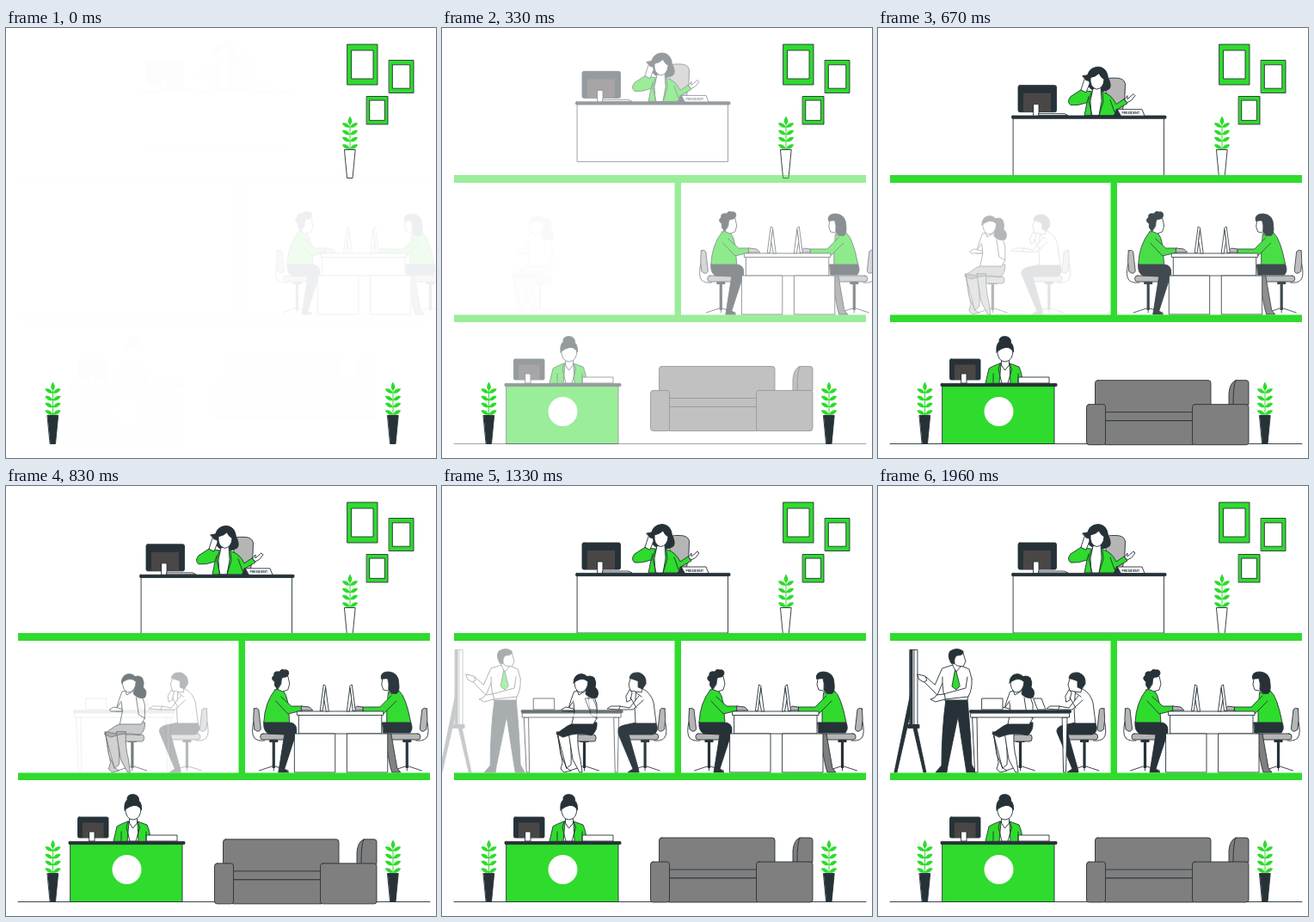
An HTML page that plays this animation: 500x500 px, repeating every 2000 ms.

```html
<!DOCTYPE html>
<html lang="en">
<head>
<meta charset="utf-8">
<title>Office</title>
<style>
html, body { margin: 0; width: 100%; height: 100%; overflow: hidden; background: #fff; }
svg { display: block; width: 100vw; height: 100vh; }
#stage { fill: #fff; stroke: #263238; stroke-width: .9; stroke-linejoin: round; stroke-linecap: round; }
.d { fill: #263238; }
.g { fill: #2fdb2d; }
.s { fill: #7f7f7f; }
.c { fill: #b5b5b5; }
.m { fill: #4a4646; }
.n { fill: none; }
.flat { stroke: none; }
text { font: 700 3.7px Inter, Arial, sans-serif; fill: #263238; stroke: none; }
</style>
</head>
<body>
<svg viewBox="0 0 500 500"><g id="stage"></g></svg>
<script>
const p = (d, c = '') => `<path class="${c}" d="${d}"/>`;
// Rectangle given by its left, top, right and bottom edges
const r = (x, y, x2, y2, c = '', rx = 0) =>
  `<rect class="${c}" x="${x}" y="${y}" width="${x2 - x}" height="${y2 - y}" rx="${rx}"/>`;
const at = (transform, body) => `<g transform="${transform}">${body}</g>`;
const group = (id, body) => `<g id="${id}">${body}</g>`;

const picture = (x, y, x2, y2, dx, dy) =>
  r(x, y, x2, y2, 'g') + r(x + dx, y + dy, x2 - dx, y2 - dy);

function plant(x, y, pot) {
  const leaf = 'M0 0C-2-5-6-6-9-5C-8-1-4 1 0 0Z';
  let s = '<path d="M0 0V-34" stroke="#2fdb2d" stroke-width="1"/>' +
    p('M0-29C-4-32-2-36 0-39C2-36 4-32 0-29Z', 'g flat');
  for (const h of [-1, -9.5, -17.5, -26])
    for (const side of [1, -1])
      s += at(`translate(0 ${h}) scale(${side} 1)`, p(leaf, 'g flat'));
  return at(`translate(${x} ${y})`, s + p('M-6.2 0H6.2L3 33H-3Z', pot));
}

const chairBase = x => at(`translate(${x} 0)`,
  r(-1.6, 296, 1.6, 328, 'd flat') + r(-5, 295, 5, 298, 'd flat') +
  p('M-17 331L-2 326H2L17 331M0 326V331', 'n'));

const chair = chairBase(310.5) +
  p('M287 274Q284 288 288 293Q292 297 300 296', 'n') +
  p('M287.5 259Q291 257 293 260L295.5 282Q295 286 291 285L288 283Q286 272 287.5 259Z', 'c') +
  r(295, 288, 332, 295, 'c', 3);
const mirror = (sum, body) => at(`translate(${sum} 0) scale(-1 1)`, body);

const building = r(14, 171, 493, 180, 'g flat') + r(270.5, 180, 278, 334, 'g flat') +
  r(14, 333.5, 493, 342, 'g flat') + p('M14 483.5H493', 'n');

const reception =
  // receptionist
  p('M125 413L129 396Q131 394 142 390H153L164 394Q167 400 168.500 413Z', 'g') +
  p('M143 391L141 413H154L153 391L148 397Z') + p('M143.500 382V392L147.500 398L152.500 392V382Z') +
  p('M142 390L140 397L144 413M153 390L155.500 397L151 413M134 402V413M163 402V413', 'n') +
  p('M138.500 374Q139 388 148 388Q157 387 157 374Q148 368 138.500 374Z') +
  p('M138 377Q137 368 141 365Q140 359 147.500 358.500Q155 359 154.500 366Q158 369 157.500 377Q156 373 151 371Q143 372 138 377Z', 'd') +
  r(83.5, 385, 119, 409, 'd', 1.5) + r(89, 391.5, 113.5, 409, 'm flat') + r(97, 402, 103, 413) +
  r(163.5, 406, 199, 413) +
  r(75, 416, 205, 483.5, 'g') + r(73, 413.4, 208, 416.6, 'd', 1) +
  '<circle class="flat" cx="140.500" cy="446" r="17"/>';

const sofa = r(252.5, 409, 387, 457, 's', 3) + r(264, 446, 387, 456, 's') +
  r(264, 456, 367, 484, 's') + r(242.5, 437, 264.5, 484, 's', 3) +
  p('M408 437V424Q409 412 416 409H428Q431 409 431 412V437Z', 's') +
  p('M416 409Q413 415 413 437', 'n') + r(365.5, 437, 431, 484, 's', 3);

const president =
  p('M264 60Q267 57 275 57.500Q286 57 287.500 64Q288 80 284 97L268 99Z', 'c') +
  p('M243 60Q243 45 256 44.500Q266 45 267.500 57Q272 66 269 70Q262 75 251 72Q243 69 243 60Z', 'd') +
  p('M248 73Q241 73 238 70L224 79Q219 85 224 89Q233 90 243 86L240 101H276L276 95L290 87L286 82L277 88Q272 77 262 74Z', 'g') +
  p('M250 70L247 84L248 101H257L260 84L259 68Z') +
  p('M248 74L245 84L249 101M261 75L262 85L257 101M243 86L245 79M270 83L275 97', 'n') +
  p('M247 57Q246 68 254 70.500Q262 70 263 59Q259 57 257 52Q253 56 247 57Z') +
  p('M236 71L239 62Q240 56 245 57L246 64L242 74Z') + p('M238 55L244 54L246 61L242 60Z', 'd') +
  p('M287 82L290 78L290 82L297 76L299 78Q295 85 290 86Z') +
  r(163, 66, 207.5, 97, 'd', 2) + r(169, 75, 201, 97, 'm flat') +
  r(181, 88, 187, 102) + p('M187 99H217L221 101H187Z') +
  r(157.5, 104, 332.5, 171) + r(155.5, 101.4, 335, 104.6, 'd', 1) +
  p('M278 94H307L310 101.500H282Z') + p('M278 94L274 101.500H282Z', 'd') +
  '<text x="283.500" y="99.500">PRESIDENT.</text>';

const screen = p('M364.500 261L368.500 231L371 232.500L367.500 261Z') +
  p('M371 235L374.500 262H371.500L369 248Z');

const duo = chair + mirror(776, chair) +
  // man at the left
  p('M299 275H328Q338 275 337 286L323 329L328 333H316L317 327L323 289L304 288Q298 284 299 275Z', 'd') +
  p('M312 237L320 236Q326 243 327 252L329 275H299Q300 252 312 237Z', 'g') +
  p('M319 245L331 256L344 256V261L327 265L313 250', 'g') + p('M343 256L352 257L356 261H343Z', 'c') +
  p('M315 224L327 221L329 230L327 237L321 239L314 236Z') +
  p('M315 236Q310 232 312 228Q306 224 311 220Q310 215 317 216Q319 212 323 214Q328 213 328 218Q327 223 321 222Q319 224 319 230Z', 'd') +
  // woman at the right
  p('M439 288H447L454 328L458 333H448L446 326Z', 's') +
  p('M437 275H470Q473 282 469 287H438Z', 'd') +
  p('M444 240L456 238Q464 244 470 275H442V260Z', 'g') +
  p('M447 244L434 257L414 257V262L438 265L453 250', 'g') + p('M414 257L407 256L402 261H414Z', 'c') +
  p('M437 224L436 231L438 237L443 238L448 242L449 221Z') +
  p('M435.500 224Q434 216 444 216Q456 217 456 230Q457 238 454 241Q448 243 444 237Q445 229 443 224Z', 'd') +
  // desk
  r(340, 266, 436, 288) + r(338, 262, 438, 266.5) + r(335, 288, 382, 333) + r(396, 288, 443, 333) +
  screen + mirror(770, screen);

const woman = chairBase(165.5) + r(153, 289, 179, 297, 'c', 3) +
  group('legs',
    p('M134 286L138 312L145 328L150 331L142 333L138 329L140 322Z M134 286L148 288Q151 312 150 324L145 328Z') +
    p('M147 286L152 318L160 333H163L161 318Q157 304 158 286Z')) +
  `<g id="skirt">${p('M133 288L146 279Q158 272 180 275Q181 284 174 290Q158 285 141 292Z', 'd')}</g>` +
  p('M154 239L165 237Q177 240 180 254L180 270L176 277H151L154 262L146 262L150 249Z') +
  p('M153 250L146 260M170 246L173 266L180 270M153 252L154 262', 'n') +
  p('M139 260L144 257L153 259L154 262H141Z') +
  p('M157 237L159 243L166 239V234Z') +
  p('M166 223Q172 219 177 223Q180 229 178 234Q184 239 180 246Q173 248 167 242Q169 235 166 229Z', 'd') +
  p('M154 228Q154 237 160 240Q169 240 170 227L162 221Z') +
  p('M153 229Q153 219 162 218.500Q170 219 171 228L166 225Q160 223 153 229Z', 'd');

const man = mirror(550.5, chair) +
  p('M253 276Q257 286 249 289L221 289L232 328L233 333H220L226 329L208 286Q207 280 216 278L230 275Z', 'd') +
  p('M230 238L238 236Q247 241 250 252L253 276H229L228 258Z') +
  p('M233 244L222 258L210 256L208 260H226L238 249') + p('M211 256L200 256L196 259L209 260Z') +
  p('M218 244L222 237L225 240L223 249L219 251Z') + p('M223 246L230 258M229 240L236 245', 'n') +
  p('M223 224L221 231L223 238L229 239L236 240L238 222Z') +
  p('M222 223Q223 216 233 217Q242 220 241 230L237 236L232 234V227Z', 'd');

const table = r(121, 247, 145, 260) + p('M181 247H190L195 260H186Z') +
  p('M110 269H115L116 333H113Z') + p('M214.500 269H220L218.500 333H216Z') +
  r(108, 264, 222.5, 269) + r(106.5, 260.8, 224.5, 263.7, 'd', 1);

const presenter =
  p('M79 248H104Q108 290 109 324L114 333H103L93 268L81 326L80 333H67L74 325Q74 285 79 248Z', 'd') +
  p('M75 212L87 208L97 209L106 213L109 224L104 249H77L75 229L69 243L53 227L56 222L66 231Z') +
  p('M75 229V222', 'n') + p('M46 219L55 221L57 226L53 228L48 225Z') +
  p('M90 212L86 233L91 237L95 233Z', 'g') +
  p('M104 222L102 235L76 242L77 248L105 245Q110 236 109 224') +
  p('M77 242L68 243L66 246L61 248L67 251L78 248Z') +
  p('M87 203V209L91 216L97 209V204Z') +
  p('M86 197L99 194L102 204L99 210L92 209L86 204Z') +
  p('M85 206Q80 197 84 192Q92 187 99 192Q100 197 92 197Q88 199 89 206Z', 'd');

const easel = p('M39 236L19 333H22L41 250Z', 'd') + p('M41 281L53 333H56L45 281Z', 'd') +
  r(37.5, 190.5, 46, 278) + r(37.5, 190.5, 40, 278, 'd') + p('M42 191V278', 'n') + r(35, 277.5, 48, 281.5, 'd');

const stage = document.getElementById('stage');
stage.innerHTML =
  picture(397, 19, 432, 66, 5, 7) + picture(445.5, 37.5, 474, 75.5, 4.2, 5.3) +
  picture(419.5, 79.5, 444, 112, 3.6, 4.6) + plant(400, 141.5, '') +
  group('president', president) + group('easel', easel) + group('presenter', presenter) +
  group('woman', woman) + group('man', man) + group('table', table) + group('duo', duo) +
  group('building', building) + group('sofa', sofa) + group('reception', reception) +
  plant(54.5, 450.5, 'd') + plant(450, 450.5, 'd');

// Time in ms, horizontal shift, opacity
const tracks = {
  woman: [[290, -54, 0], [330, -52, .02], [670, -32, .35], [1000, -5, .93], [1150, 0, 1]],
  man: [[500, -50, 0], [670, -41, .13], [1000, -18, .55], [1330, -4, .95], [1480, 0, 1]],
  table: [[760, -30, 0], [1000, -24, .25], [1330, -14.5, .68], [1580, -4, .93], [1780, 0, 1]],
  presenter: [[880, -30, 0], [1000, -27.5, .09], [1330, -18, .39], [1580, -8.5, .7], [1960, 0, 1]],
  easel: [[950, -30, 0], [1000, -29, .04], [1330, -22, .25], [1580, -14, .53], [1960, 0, 1]]
};

const clamp = v => Math.min(1, Math.max(0, v));

function bezier(x1, y1, x2, y2, x) {
  const curve = (a, b, s) => 3 * (1 - s) ** 2 * s * a + 3 * (1 - s) * s * s * b + s ** 3;
  let lo = 0, hi = 1;
  for (let i = 0; i < 24; i++) {
    const mid = (lo + hi) / 2;
    if (curve(x1, x2, mid) < x) lo = mid; else hi = mid;
  }
  return curve(y1, y2, lo);
}

function sample(keys, t) {
  const i = keys.findIndex(k => k[0] > t);
  if (i < 0) return keys[keys.length - 1];
  if (!i) return keys[0];
  const a = keys[i - 1], b = keys[i], u = (t - a[0]) / (b[0] - a[0]);
  return a.map((v, j) => v + (b[j] - v) * u);
}

function place(id, x, y, opacity) {
  const el = document.getElementById(id);
  el.setAttribute('transform', `translate(${x} ${y})`);
  el.setAttribute('opacity', clamp(opacity));
}

const legs = document.getElementById('legs'), skirt = document.getElementById('skirt');

function draw(now) {
  // 24 steps a second, the first already one step in
  const step = Math.floor((now % 2000 + 6) * .024) % 48;
  const t = step / .024, u = clamp((step + 1) / 24);

  const drop = bezier(.36, -.01, .5, 1.38, u), slide = bezier(0, 0, .58, 1, u);
  for (const id of ['building', 'reception']) place(id, 0, 0, drop);
  for (const id of ['president', 'sofa']) place(id, 0, 30 * (drop - 1), drop);
  place('duo', 30 * (1 - slide), 0, slide);

  for (const id in tracks) {
    const [, x, opacity] = sample(tracks[id], t);
    place(id, x, 0, opacity);
  }
  const k = clamp((t - 1000) / 300), shade = Math.round(184 + 71 * k);
  legs.style.fill = `rgb(${shade},${shade},${shade})`;
  skirt.style.fillOpacity = .4 + .6 * k;
  requestAnimationFrame(() => draw(performance.now() - start));
}

const start = performance.now();
draw(0);
</script>
</body>
</html>
```
